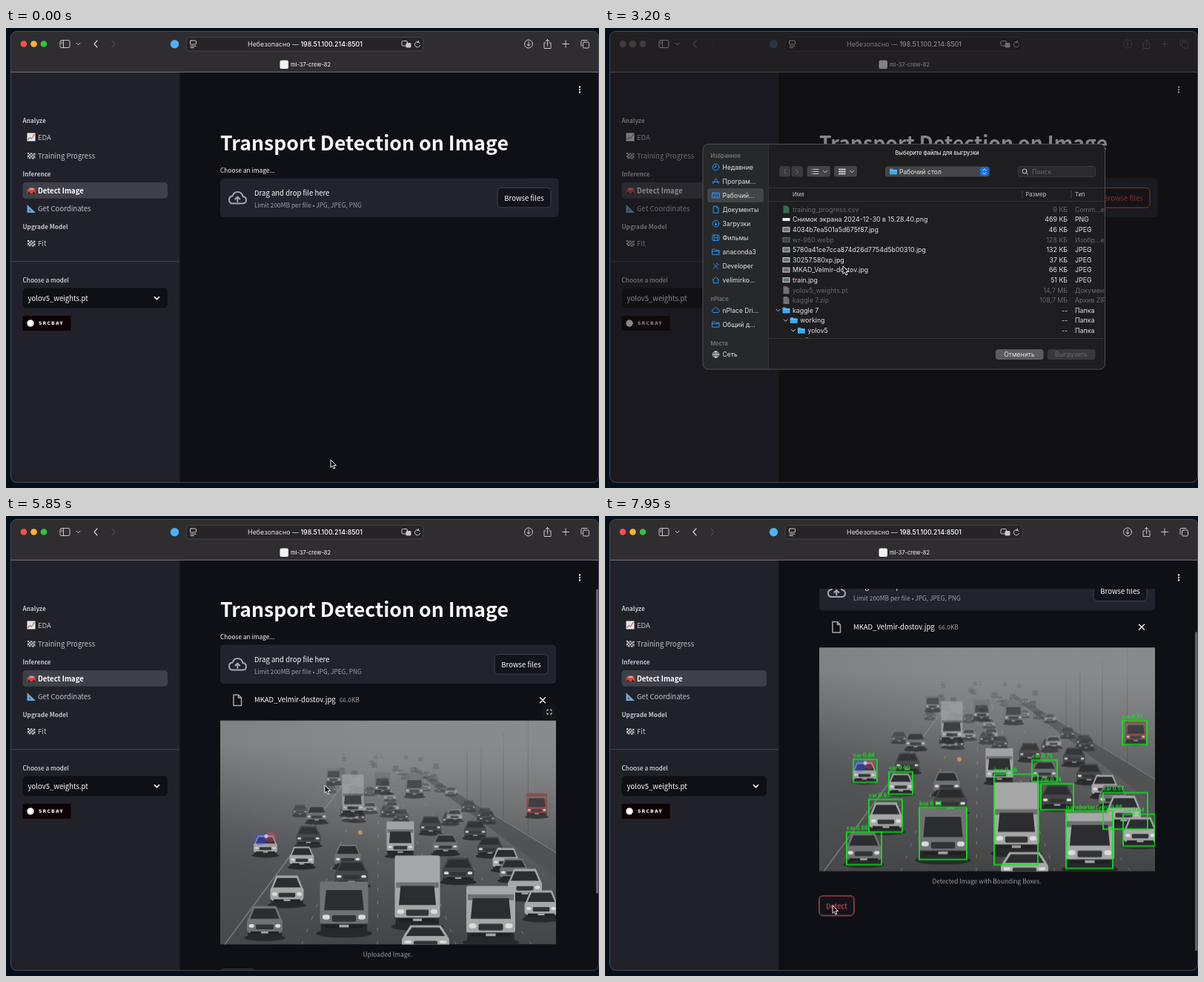
Write an HTML page that moves like this. It is 800 px wide and 620 px high and loops after 8000 ms.

```html
<!DOCTYPE html>
<html lang="ru">
<head>
<meta charset="utf-8">
<title>Transport detection</title>
<style>
html, body { margin: 0; width: 100%; height: 100%; overflow: hidden; background: #04111d; }
svg { display: block; }
text { white-space: pre; fill: #fafafa; }
.page text { font: 9.55px "Noto Sans CJK JP", "Noto Sans CJK SC", "Noto Sans", sans-serif; }
.page .small { font-size: 8.36px; }
.page .muted { fill: #9c9da5; }
.page .head { font-size: 8.2px; font-weight: 600; fill: #c3c4c9; }
.page .item { fill: #c0c1c6; }
.page .active { fill: #fff; font-weight: 600; }
.page .title { font-size: 26.65px; font-weight: 700; }
.page .badge { font: bold 6.2px "DejaVu Sans", sans-serif; letter-spacing: 1.1px; }
.page .tag { font: 700 7px Inter, sans-serif; fill: #0fe61a; }
.mac text { font: 8.6px Inter, sans-serif; fill: #e2e2e3; }
.mac .url { font-size: 8.85px; }
.mac #files text { font-size: 8.8px; }
.mac .group { font-size: 7.4px; font-weight: 600; fill: #77777a; }
.mac .col { font-size: 7.6px; fill: #c4c4c6; }
.mac .off text, .mac .off { fill: #68686a; }
.mid { text-anchor: middle; }
.end { text-anchor: end; }
.line { fill: none; stroke: #c9c8ca; stroke-width: 1; stroke-linecap: round; stroke-linejoin: round; }
.blue { stroke: #2493f5; }
.cloud { fill: none; stroke: #a5a5b0; stroke-width: 2; stroke-linecap: round; stroke-linejoin: round; }

.cursor, .sheet, .dim, .scroll, .thumb { animation: 8s linear infinite; }
.cursor { animation-name: point; animation-timing-function: ease-in-out; }
.sheet { animation-name: sheet; }
.dim { animation-name: dim; }
.scroll { animation-name: scroll; }
.thumb { animation-name: thumb; }
.hover, .picked, .before, .after, .photo, .expand, .aim, .found, .plain, .gray1, .gray2, .tools { animation: 8s step-end infinite; }
.hover { animation-name: hover; }
.picked { animation-name: picked; }
.before { animation-name: before; }
.after { animation-name: after; }
.photo { animation-name: photo; }
.expand { animation-name: expand; }
.aim { animation-name: aim; }
.found { animation-name: found; }
.plain { animation-name: plain; }
.gray1 { animation-name: gray1; }
.gray2 { animation-name: gray2; }
.tools { animation-name: tools; }

@keyframes point {
  0%, 5% { transform: translate(438px, 582px); }
  18.5%, 30% { transform: translate(702px, 220px); }
  38%, 42% { transform: translate(321px, 321px); }
  46%, 58% { transform: translate(315px, 327px); }
  69%, 80% { transform: translate(430px, 363px); }
  85%, 100% { transform: translate(307px, 525px); }
}
@keyframes sheet {
  0%, 25.5% { opacity: 0; transform: translateY(-20px); }
  28.5%, 47.8% { opacity: 1; transform: none; }
  50.4% { opacity: .2; transform: translateY(-20px); }
  51.4%, 100% { opacity: 0; transform: translateY(-20px); }
}
@keyframes dim { 0%, 25% { opacity: 0; } 28.5%, 48.5% { opacity: .5; } 52%, 100% { opacity: 0; } }
@keyframes scroll {
  0%, 71.5% { transform: none; }
  73.1% { transform: translateY(-28px); animation-timing-function: ease-out; }
  80%, 100% { transform: translateY(-127.5px); }
}
@keyframes thumb {
  0%, 60.49% { opacity: 0; y: 98px; height: 410px; }
  60.5%, 73.1% { opacity: 1; y: 98px; height: 410px; animation-timing-function: ease-out; }
  80%, 100% { opacity: 1; y: 156px; height: 430px; }
}
@keyframes hover { 0% { opacity: 0; } 17% { opacity: 1; } 56%, 100% { opacity: 0; } }
@keyframes picked { 0% { opacity: 0; } 44.5%, 100% { opacity: 1; } }
@keyframes before { 0% { opacity: 1; } 56%, 100% { opacity: 0; } }
@keyframes after { 0% { opacity: 0; } 56%, 100% { opacity: 1; } }
@keyframes photo { 0% { opacity: 0; } 60.5%, 100% { opacity: 1; } }
@keyframes expand { 0% { opacity: 0; } 63% { opacity: 1; } 82%, 100% { opacity: 0; } }
@keyframes aim { 0% { opacity: 0; } 84.5%, 100% { opacity: 1; } }
@keyframes found { 0% { opacity: 0; } 92.5%, 100% { opacity: 1; } }
@keyframes plain { 0% { opacity: 1; } 92.5%, 100% { opacity: 0; } }
@keyframes gray1 { 0% { opacity: 0; } 26% { opacity: 1; } 52%, 100% { opacity: 0; } }
@keyframes gray2 { 0% { opacity: 0; } 26% { opacity: 1; } 50%, 100% { opacity: 0; } }
@keyframes tools { 0% { opacity: 1; } 26% { opacity: .35; } 52%, 100% { opacity: 1; } }
</style>
</head>
<body>
<svg width="800" height="620" viewBox="0 0 800 620">
  <defs>
    <clipPath id="window"><rect x="6.5" y="4.5" width="793" height="608" rx="8"/></clipPath>
    <clipPath id="main"><rect x="235" y="98" width="565" height="514"/></clipPath>
    <clipPath id="frame"><rect width="453" height="302"/></clipPath>
    <clipPath id="list"><rect x="221" y="234" width="453.5" height="184"/></clipPath>
    <linearGradient id="fog" x2="0" y2="1">
      <stop offset="0" stop-color="#8f9092"/><stop offset=".17" stop-color="#8a8b8c"/>
      <stop offset=".35" stop-color="#747577"/><stop offset=".6" stop-color="#5a5b5d"/>
      <stop offset="1" stop-color="#434446"/>
    </linearGradient>
    <linearGradient id="shade"><stop offset="0" stop-color="#4b4d50" stop-opacity=".55"/><stop offset=".45" stop-color="#4b4d50" stop-opacity="0"/></linearGradient>
    <linearGradient id="haze" x2="0" y2="1">
      <stop offset=".1" stop-color="#88898a" stop-opacity=".75"/><stop offset=".55" stop-color="#6a6b6c" stop-opacity="0"/>
    </linearGradient>
    <g id="folder"><path d="M0 1q0-1 1-1h3l1 1.2h4q1 0 1 1V7q0 1-1 1H1Q0 8 0 7Z" fill="#3fa9ee"/><path d="M0 2.6h10" stroke="#8fd0fa" stroke-width=".7"/></g>
    <path id="down" d="M-2.5-1.2 0 1.3 2.5-1.2"/>
  </defs>

  <g clip-path="url(#window)">
    <rect width="800" height="620" fill="#0e1015"/>
    <rect y="59" width="234.5" height="561" fill="#21212a"/>
    <rect width="800" height="59" fill="#2f2d2f"/>
    <path d="M0 59.4H800" stroke="#7f8286" stroke-width=".9"/>

    <g class="mac">
      <circle cx="24" cy="21.5" r="4.3" fill="#fe5049"/><circle cx="37.5" cy="21.5" r="4.3" fill="#fdb42c"/><circle cx="51" cy="21.5" r="4.3" fill="#2fc440"/>
      <circle class="gray1" cx="24" cy="21.5" r="4.4" fill="#6b696b"/>
      <g class="gray2" fill="#6b696b"><circle cx="37.5" cy="21.5" r="4.4"/><circle cx="51" cy="21.5" r="4.4"/></g>
      <g class="line">
        <rect x="73" y="16.5" width="13" height="10" rx="2"/><path d="M77.5 17v9M74.7 19h1.2M74.7 21h1.2"/>
        <use href="#down" x="97.5" y="21.5"/>
      </g>
      <g class="tools">
        <g class="line">
          <path d="m123 17-4 4.5 4 4.5" stroke-width="1.3"/><path d="m143 17 4 4.5-4 4.5" stroke="#5d5a5d"/>
          <circle cx="705" cy="21.5" r="5.5"/><path d="M705 18.5v5.5m-2-2 2 2.2 2-2.2"/>
          <path d="M728 20h-2v7.5h9V20h-2M730.5 24v-8.5m-2.3 2.3 2.3-2.3 2.3 2.3"/>
          <path d="M755 17v9m-4.5-4.5h9"/>
          <rect x="778.5" y="19" width="8" height="8" rx="1.5"/><path d="M776 24.5V18q0-1.5 1.5-1.5h6.5"/>
        </g>
        <circle cx="227.5" cy="21.7" r="5.7" fill="#4cb3f8"/>
      </g>
      <rect x="243" y="12.5" width="320" height="18.5" rx="5" fill="#262426" stroke="#444244"/>
      <g class="line"><rect x="248.5" y="17" width="8" height="5" rx="1"/><path d="M249 24.3h7M249 26.5h4.5"/></g>
      <text class="mid url" x="403.5" y="24.7">Небезопасно — <tspan font-weight="500" fill="#fff">198.51.100.214:8501</tspan></text>
      <rect x="534" y="17.5" width="7.5" height="6.5" rx="1.5" fill="none" stroke="#c9c8ca"/><rect x="539.5" y="20" width="7" height="6.5" rx="1.5" fill="#c9c8ca"/>
      <path class="line" d="M558.3 20.5a3.7 3.7 0 1 0 .3 2.7M556 17l.7 2-2 .8"/>
      <rect x="369.5" y="43.5" width="11.5" height="11.5" rx="2.5" fill="#f2f2f2"/>
      <text x="384" y="52" style="font-size:7.4px;font-weight:500">ml-37-crew-82</text>
    </g>

    <g class="page">
      <rect x="22.5" y="208" width="195.5" height="21.7" rx="4.5" fill="#40404a"/>
      <g id="nav"></g>
      <g transform="translate(28.5 141.5)"><rect width="11" height="11" fill="#e8ebee"/><path d="M1 9 4 6l2 1.5L10 1.5" fill="none" stroke="#d34a4a" stroke-width="1.2"/><path d="M0 3.5h11M0 7h11M3.5 0v11M7.5 0v11" stroke="#9db" stroke-width=".3"/></g>
      <g id="flags"></g>
      <path d="M28.5 218q2-1 3-3h6q2 2 2.5 4v4h-11Z" fill="#d8402f"/><path d="M32 216h5l1 2.2h-7Z" fill="#88bcd0"/><circle cx="31" cy="222.5" r="1.4" fill="#222"/><circle cx="37.5" cy="222.5" r="1.4" fill="#222"/>
      <path d="M28.5 238v11H40Zm2.8 6.2 2.4 2.4h-2.4Z" fill="#6fa9d8" fill-rule="evenodd"/>
      <path d="M7 314.7h227" stroke="#43444d"/>
      <text class="small" x="22.5" y="343">Choose a model</text>
      <rect x="22.5" y="350.5" width="195.5" height="27" rx="5" fill="#0e1015"/>
      <text x="29.5" y="368">yolov5_weights.pt</text>
      <use href="#down" class="line" style="stroke:#fff;stroke-width:1.3" transform="translate(203.5 364) scale(1.25)"/>
      <rect x="22.5" y="388" width="65" height="20" fill="#0c0204"/>
      <circle cx="33" cy="398" r="4.7" fill="#fff"/>
      <text class="badge" x="44" y="400.3">SRCBAY</text>
      <g fill="#fafafa"><circle cx="774" cy="79.5" r="1.2"/><circle cx="774" cy="83" r="1.2"/><circle cx="774" cy="86.5" r="1.2"/></g>

      <g clip-path="url(#main)">
        <g class="scroll">
          <text class="title" x="289" y="165">Transport Detection on Image</text>
          <text class="small" x="289" y="195">Choose an image...</text>
          <rect x="289" y="202.5" width="453" height="52.5" rx="5" fill="#22232c"/>
          <rect class="before" x="700" y="202.5" width="45.7" height="52.5" rx="5" fill="#22232c"/>
          <path class="cloud" d="M306 236.5q-5 0-5-5 0-4.5 4.5-5 2-5.5 7-5.5 5.5 0 7 6 4.5.5 4.5 4.800 0 4.700-4.500 4.700Z"/><path class="cloud" d="M312.3 234v-6m-3 2.5 3-3 3 3"/>
          <text x="335" y="225.5">Drag and drop file here</text>
          <text class="small muted" x="335" y="241.7">Limit 200MB per file • JPG, JPEG, PNG</text>
          <g id="browse"></g>
          <g class="after">
            <path class="cloud" style="stroke-width:1.5" d="M307 270h6.5l4 4v10.5H307Zm6.5 0v4h4"/>
            <text x="335" y="280">MKAD_Velmir-dostov.jpg<tspan class="small muted" dx="5">66.0KB</tspan></text>
            <path class="line" style="stroke:#fafafa;stroke-width:1.4" d="m720.5 273.7 7 7m0-7-7 7"/>
          </g>
          <g class="photo">
            <g transform="translate(289 304.5)" clip-path="url(#frame)">
              <rect width="453" height="302" fill="url(#fog)"/>
              <rect width="453" height="302" fill="url(#shade)"/>
              <path d="M262 62 453 178v34L262 68Z" fill="#515254"/><path d="M262 62 453 178" stroke="#858687"/>
              <path d="M415.5 0v155M382 18v116M352 34v83M333 42v64" stroke="#58595b" stroke-width="1.2" opacity=".75"/>
              <g stroke="#b4b4b4" fill="none" opacity=".45">
                <path d="M6 302 176 72" stroke-width="1.4"/><path d="M110 302 198 75M212 302 214 75M318 302 232 75M420 302 248 75" stroke-dasharray="5 13"/>
              </g>
              <g id="far"></g>
              <rect width="453" height="302" fill="url(#haze)"/>
              <g id="cars"></g>
              <g fill="#4054ff"><ellipse cx="54" cy="160" rx="9" ry="8" opacity=".4"/><ellipse cx="68" cy="157" rx="8" ry="7" fill="#e5456a" opacity=".35"/><circle cx="62" cy="156" r="2.5" fill="#b9c5ff"/></g>
              <circle cx="189" cy="151" r="3" fill="#f0b060" opacity=".65"/>
              <g id="boxes" class="found"></g>
            </g>
            <text class="small muted mid plain" x="515" y="622.5">Uploaded Image.</text>
            <text class="small muted mid found" x="515" y="622.5">Detected Image with Bounding Boxes.</text>
            <g class="expand"><rect x="723" y="283" width="19" height="20" rx="3" fill="#13161d"/><path class="line" style="stroke:#eee" d="M730 291.5v-1.5h1.5m3 0h1.5v1.5m0 3v1.5h-1.5m-3 0H730v-1.5"/></g>
            <g id="detect"></g>
          </g>
        </g>
      </g>
      <rect class="thumb" x="796" y="98" width="3.3" height="410" rx="1.6" fill="#63646a"/>
    </g>
    <rect class="dim" width="800" height="620" fill="#151215"/>
  </g>
  <rect x="6.5" y="4.5" width="793" height="608" rx="8" fill="none" stroke="#4f5256" stroke-width=".9"/>

  <g class="sheet mac">
    <rect x="132" y="156.5" width="542.5" height="303.5" rx="7" fill="#1e1d1f"/>
    <path d="M220.5 156.5V460H139q-7 0-7-7V163.5q0-7 7-7Z" fill="#27282a"/>
    <path d="M220.5 157v303M221 215.5h453M221 233.5h453M221 418.5h453" stroke="#39383a" stroke-width=".8"/>
    <rect x="138" y="216" width="76" height="19" rx="4" fill="#434447"/>
    <g id="places"></g>
    <text class="mid" x="448" y="170.5" style="font-size:7.4px;font-weight:500">Выберите файлы для выгрузки</text>
    <g fill="#3b3a3c"><rect x="235" y="186" width="15" height="14.5" rx="3.5"/><rect x="251.5" y="186" width="15.5" height="14.5" rx="3.5"/></g>
    <g fill="#454446"><rect x="272.5" y="186" width="31.5" height="14.5" rx="3.5"/><rect x="309" y="186" width="31" height="14.5" rx="3.5"/><rect x="378" y="186.5" width="141" height="14" rx="3.5"/></g>
    <rect x="506" y="187.5" width="11.5" height="12" rx="3" fill="#1670e0"/>
    <rect x="557" y="186.5" width="104.5" height="14" rx="3.5" fill="#2b2a2c" stroke="#39383a"/>
    <g class="line">
      <path d="m244 190.5-2.5 3 2.5 3m14-6 2.5 3-2.5 3" stroke="#77767a"/>
      <path d="M279 190.5h.1m1.9 0h7m-9 3h.1m1.9 0h7m-9 3h.1m1.9 0h7"/>
      <path d="M316 190.5h8m-8 3h8m-8 3h8" stroke-dasharray="1.5 1.7" stroke-width="2"/>
      <use href="#down" x="297" y="193.5"/><use href="#down" x="333" y="193.5"/>
      <path d="m510 192 1.8-2 1.8 2m-3.6 3 1.8 2 1.8-2" stroke="#fff"/>
      <circle cx="566" cy="193" r="3"/><path d="m568.3 195.3 2.2 2.2"/>
    </g>
    <use href="#folder" x="384" y="189.5"/><text x="397" y="196.5">Рабочий стол</text>
    <text class="off" x="576" y="196.5">Поиск</text>
    <text class="col" x="253" y="227">Имя</text><text class="col" x="567.5" y="227">Размер</text><text class="col" x="634" y="227">Тип</text>
    <path d="M563 219v11M629 219v11" stroke="#454446"/>
    <g clip-path="url(#list)">
      <rect class="picked" x="227" y="319.3" width="448" height="13.5" fill="#48484c"/>
      <g id="files"></g>
    </g>
    <rect x="527" y="433" width="64.5" height="14" rx="3.5" fill="#5c5b5d"/><text class="mid" x="559" y="443">Отменить</text>
    <rect x="597" y="433" width="64.5" height="14" rx="3.5" fill="#39383a"/><text class="mid off" x="629" y="443">Выгрузить</text>
    <rect x="132" y="156.5" width="542.5" height="303.5" rx="7" fill="none" stroke="#565557" stroke-width=".9"/>
  </g>

  <path class="cursor" d="M0 0V10.3L2.4 8.2 4 12 5.9 11.2 4.3 7.5H7.5Z" fill="#111" stroke="#fff" stroke-width=".9" stroke-linejoin="round"/>
</svg>
<script>
const fill = (id, items, draw) => { document.getElementById(id).innerHTML = items.map(draw).join(''); };
const text = (x, y, label, cls = '') => `<text x="${x}" y="${y}" class="${cls}">${label}</text>`;
const rect = (x, y, w, h, color, more = '') => `<rect x="${x}" y="${y}" width="${w}" height="${h}" fill="${color}" ${more}/>`;

fill('nav', [
  ['Analyze', 128.3, 'head'], ['EDA', 151, 'item'], ['Training Progress', 175.8, 'item'],
  ['Inference', 199.5, 'head'], ['Detect Image', 222.5, 'active'], ['Get Coordinates', 247, 'item'],
  ['Upgrade Model', 270.8, 'head'], ['Fit', 293.8, 'item']
], ([label, y, cls]) => text(cls === 'head' ? 22.5 : 43, y, label, cls));

fill('flags', [168, 286], y => {
  let cells = '';
  for (let i = 0; i < 20; i++) {
    const col = i % 5, row = i / 5 | 0;
    cells += rect(29 + col * 2.1, y + row * 2 + col * .2, 2.1, 2, (col + row) % 2 ? '#4b5357' : '#d5dadc');
  }
  return cells;
});

const button = (x, y, w, label, hot) =>
  rect(x, y, w, 26.5, '#12141b', `rx="5" stroke="${hot ? '#f0524d' : '#41434c'}"`) +
  `<text class="mid" x="${x + w / 2}" y="${y + 17}" ${hot ? 'style="fill:#e8504b"' : ''}>${label}</text>`;
fill('browse', [['before', 663, 0], ['hover', 663, 1], ['after', 659, 0]],
  ([cls, x, hot]) => `<g class="${cls}">${button(x, 215.5, 72, 'Browse files', hot)}</g>`);
fill('detect', [['', 0], ['aim', 1]],
  ([cls, hot]) => `<g class="${cls}">${button(289, 639.5, 47, 'Detect', hot)}</g>`);

// Each vehicle: centre, ground line, width, height, paint.
function vehicle([x, y, w, h, paint]) {
  const tall = h > w, left = x - w / 2;
  const part = (x1, top, width, height, color, round = 0) =>
    rect(x - w * width / 2 + w * x1, y - top, w * width, height, color, `rx="${w * round}"`);
  const glass = (top, end, inset) =>
    `<path d="M${left + w * .09} ${y - end}L${left + w * inset} ${y - top}H${x + w * (.5 - inset)}L${x + w * .41} ${y - end}Z" fill="#2b2d30"/>`;
  const base = Math.min(h, w * .9);
  const body = tall
    ? part(0, h, 1, h - w * .2, paint, .04) + part(0, w * .98, .94, w * .12, '#6f7072') + glass(w * .9, w * .48, .13)
    : `<path d="M${left + w * .03} ${y - h * .58}L${left + w * .18} ${y - h}H${x + w * .32}L${x + w * .47} ${y - h * .58}Z" fill="${paint}"/>` +
      part(0, h * .62, 1, h * .47, paint, .1) + glass(h * .92, h * .6, .21);
  const lamps = [-.37, .37].map(k => part(k, base * .43, .15, base * .11, '#dcdcd8', .05)).join('');
  return `<g opacity="${Math.min(1, .25 + y / 270)}">` +
    `<ellipse cx="${x}" cy="${y}" rx="${w * .58}" ry="${w * .09}" fill="#29292b"/>` +
    part(0, base * .26, .96, base * .26, '#27282a', .04) + body +
    part(0, base * .42, .5, base * .15, '#323335', .03) + lamps +
    part(0, base * .2, .8, base * .07, '#1f2022') + part(0, base * .2, .2, base * .06, '#a8a8a8') + '</g>';
}
const white = '#a6a7a8', gray = '#707173', dark = '#444547';
let seed = 11;
const random = () => (seed = seed * 16807 % 2147483647) / 2147483647;
fill('far', Array.from({ length: 44 }, () => {
  const y = 50 + random() * 90;
  const w = 5 + (y - 45) * .18;
  return [218 + (random() - .45) * (y + 25) * 1.6, y, w, w * .75, random() < .4 ? white : dark];
}), vehicle);
fill('cars', [
  [153, 86, 20, 21, gray], [179, 127, 29, 54, white], [219, 98, 22, 28, gray], [262, 103, 25, 32, gray],
  [427, 130, 28, 32, '#963f3c'], [130, 138, 28, 23, gray], [119, 169, 33, 27, dark], [284, 153, 29, 24, dark],
  [344, 159, 30, 24, dark], [61, 182, 32, 27, white], [304, 180, 34, 27, gray], [243, 183, 37, 47, white],
  [364, 183, 34, 26, dark], [172, 199, 36, 32, gray], [110, 198, 33, 28, white], [385, 202, 35, 30, white],
  [321, 218, 43, 33, dark], [396, 216, 38, 30, gray], [177, 223, 45, 34, dark], [411, 240, 46, 40, white],
  [90, 249, 45, 40, white], [433, 268, 45, 39, white], [266, 278, 61, 96, white], [167, 287, 65, 70, gray],
  [60, 293, 48, 43, gray], [365, 299, 66, 76, white], [277, 312, 64, 36, white]
], vehicle);
fill('boxes', [
  [335, 328, 32, 31, 'car 0.84'], [383, 345, 32, 30, 'car 0.90'], [356, 382, 45, 44, 'car 0.91'],
  [326, 426, 47, 44, 'car 0.86'], [424, 393, 64, 70, 'bus 0.54'], [525, 348, 59, 122, 'bus 0.46'],
  [576, 329, 34, 29, 'car 0.75'], [588, 361, 44, 35, 'car 0.74'], [672, 373, 60, 49, 'car 0.57'],
  [699, 402, 43, 43, 'car 0.64'], [622, 398, 63, 77, 'transporter (van) 0.88'], [698, 276, 33, 32, 'car 0.81']
], ([x, y, w, h, label]) => rect(x - 289, y - 177, w, h, 'none', 'stroke="#0fe61a" stroke-width="1.7"') +
  text(x - 289, y - 180, label, 'tag'));

const icons = {
  clock: '<circle r="4.3"/><path d="M0-2.5V0h-2"/>',
  apps: '<path d="M-4 3.5 0-4 4 3.5M-4.5 1h9"/>',
  desk: '<rect x="-5" y="-3.5" width="10" height="7" rx="1"/><path d="M-5-1.5H5M-3 1.7h6"/>',
  doc: '<path d="M-3-4.5h4l2.5 2.5v6.5H-3ZM1-4.5V-2h2.5"/>',
  load: '<circle r="4.3"/><path d="M0-2V2m-1.7-1.5L0 2 1.7.5"/>',
  film: '<rect x="-4.5" y="-3.8" width="9" height="7.6" rx="1"/><path d="M-2.3-3.5v7m4.6-7v7M-2 0h4"/>',
  dir: '<path d="M-4.5-3.5H-1l1 1.2h4.5V3.7h-9ZM-4.5-.8h9"/>',
  tool: '<path d="M-3.5 4 2-2m-5-1 6 6.5M1-4l3 2.5"/>',
  home: '<path d="M-4.5 0 0-4 4.5 0M-3.3-.8V4h6.6V-.8"/>',
  cloud: '<path d="M-3 3q-2 0-2-2 0-1.8 2-2 .8-2.8 3-2.8T3-1q2 .2 2 2T3 3Z"/>',
  net: '<circle r="4.3"/><path d="M-4.3 0h8.6M0-4.3v8.6"/><ellipse rx="2" ry="4.3"/>'
};
fill('places', [
  [175, 'Избранное'], [187.5, 'Недавние', 'clock'], [206.5, 'Програм...', 'apps'], [225.5, 'Рабочий...', 'desk'],
  [244.7, 'Документы', 'doc'], [263.7, 'Загрузки', 'load'], [282.7, 'Фильмы', 'film'], [301.7, 'anaconda3', 'dir'],
  [320.7, 'Developer', 'tool'], [339.7, 'velimirko...', 'home'], [368, 'nPlace'], [380.5, 'nPlace Dri...', 'cloud'],
  [399.5, 'Общий д...', 'dir'], [428, 'Места'], [440, 'Сеть', 'net']
], ([y, label, icon]) => icon
  ? `<g class="line ${icon === 'net' ? '' : 'blue'}" transform="translate(149.5 ${y})">${icons[icon]}</g>` + text(158.5, y + 3.2, label)
  : text(142.5, y, label, 'group'));

// Each row: name, size, kind, icon (a number is a folder's depth), disabled.
fill('files', [
  ['training_progress.csv', '9 КБ', 'Comm...et', '#3b6b49', 1],
  ['Снимок экрана 2024-12-30 в 15.28.40.png', '469 КБ', 'PNG', 'shot'],
  ['4034b7ea501a5d675f87.jpg', '46 КБ', 'JPEG', 'pic'],
  ['wr-960.webp', '128 КБ', 'Изобр...е', 'pic', 1],
  ['5780a41ce7cca874d26d7754d5b00310.jpg', '132 КБ', 'JPEG', 'pic'],
  ['30257.580xp.jpg', '37 КБ', 'JPEG', 'pic'],
  ['MKAD_Velmir-dostov.jpg', '66 КБ', 'JPEG', 'pic'],
  ['train.jpg', '51 КБ', 'JPEG', 'pic'],
  ['yolov5_weights.pt', '14,7 МБ', 'Документ', '#707072', 1],
  ['kaggle 7.zip', '108,7 МБ', 'Архив ZIP', '#707072', 1],
  ['kaggle 7', '--', 'Папка', 0], ['working', '--', 'Папка', 1], ['yolov5', '--', 'Папка', 2], ['', '', '', 3]
], ([name, size, kind, icon, off], i) => {
  const y = 244.5 + i * 13.6;
  const depth = typeof icon === 'number' ? icon : -1;
  const indent = Math.max(0, depth) * 10.2;
  const mark = depth >= 0
    ? `<use href="#folder" x="${239.5 + indent}" y="${y - 4}"/>` +
      (name && `<use href="#down" class="line" x="${233.5 + indent}" y="${y}"/>`)
    : icon === 'shot' ? rect(239.5, y - 2, 10, 4, '#ececec')
    : icon === 'pic' ? rect(240, y - 3, 9, 6, '#68747b', `stroke="#ddd" stroke-width=".9" opacity="${off ? .45 : 1}"`)
    : `<path d="M240.5 ${y - 5}h5l3 3v7h-8Z" fill="${icon}"/>`;
  return `<g class="${off ? 'off' : ''}">${mark}${text(253 + indent, y + 3.2, name)}` +
    `${text(624, y + 3.2, size, 'end')}${text(634, y + 3.2, kind)}</g>`;
});
</script>
</body>
</html>
```
